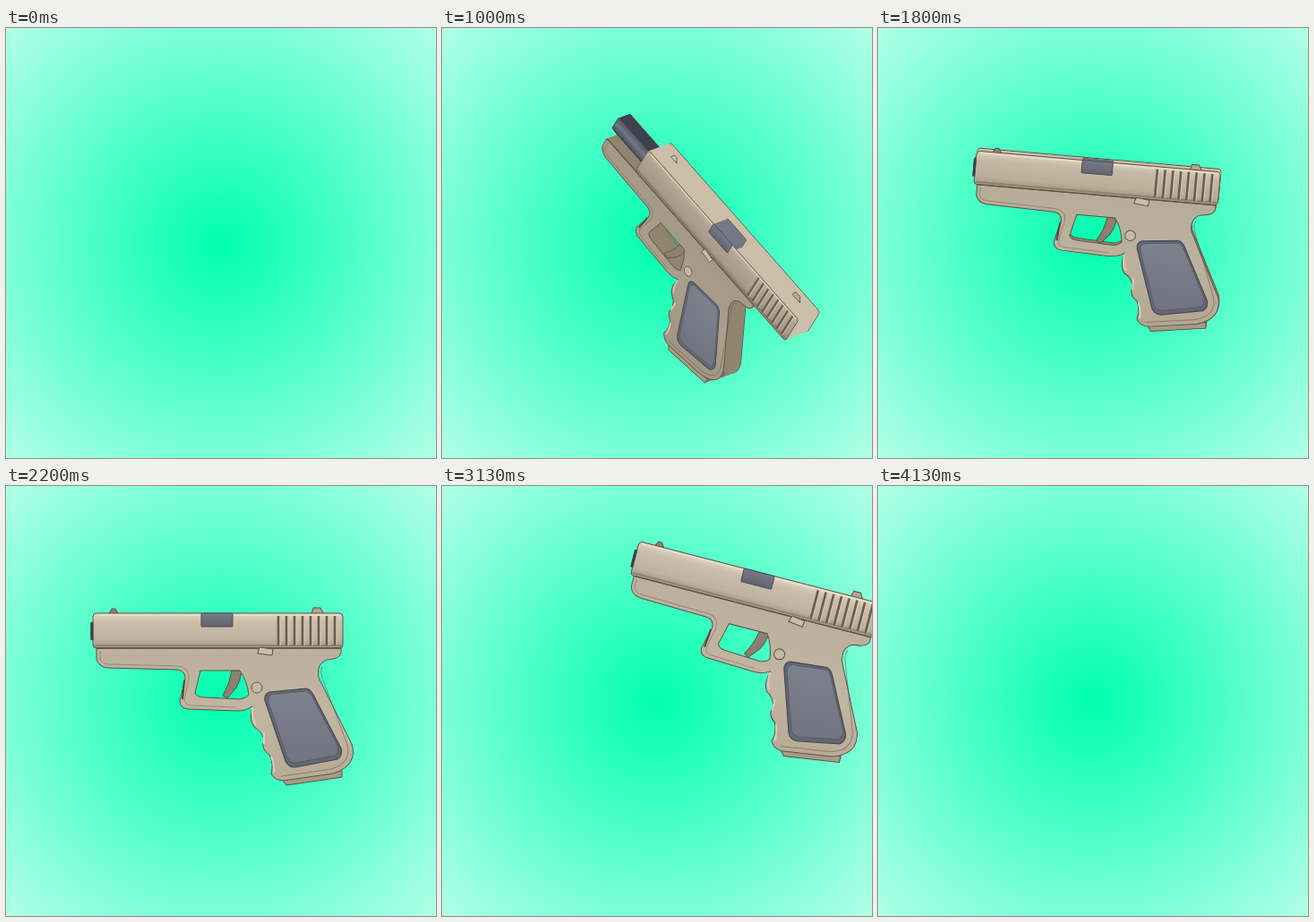
Animation of 480 by 480 pixels, one loop 4190 ms. Source, as an HTML page with a canvas:

```html
<!DOCTYPE html>
<html lang="en">
<head>
<meta charset="utf-8">
<title>Pistol</title>
<style>
html, body { margin: 0; width: 100%; height: 100%; overflow: hidden; }
canvas { display: block; width: 480px; height: 480px; }
</style>
</head>
<body>
<canvas id="stage" width="480" height="480"></canvas>
<script>
const ctx = document.getElementById('stage').getContext('2d');
const LOOP = 4190;
const PIVOT = [331, 181];
const LINE = '#5c5346';

// Rolling in: time, x axis, y axis, screen place of the pivot, depth vector
const ROLL = [
  [130, .2, .86, -.62, .25, 560, 560, 24, -3],
  [670, .43, .76, -.45, .45, 335, 298, 27, -5],
  [1000, .6, .68, -.38, .6, 322, 280, 24, -9],
  [1470, .877, .412, -.417, .771, 351, 246, 5, -15],
  [1730, .97, .103, -.104, .943, 336, 197, 1, -4],
  [2130, 1, 0, 0, 1, 331, 181, 0, 0]
];
// Flat side view: time, angle in degrees, offset from rest
const TURN = [
  [2670, 0, 0, 0],
  [2800, 15, 89, -51],
  [2930, 17, 124, -61],
  [3130, 14.5, 106, -23],
  [3330, 5, 39, -9],
  [3530, 0, 0, 0],
  [3670, 0, 0, 0],
  [3870, 9, 9, 44],
  [4000, 21, 29, 179],
  [4130, 30, 49, 459]
];
const RACK = [[670, 0], [800, 57], [1130, 57], [1200, 0], [2530, 0], [2600, 40], [2670, 57], [2730, 20], [2800, 0]];
const FLASH = [[2530, 0], [2600, .35], [2670, .35], [2800, 0]];
const PULL = [[2330, 0], [2530, 1], [2800, 1], [2930, 0]];
const SHELL = [[2600, 325, 118], [2670, 445, 13]];

function sample(keys, t) {
  const next = keys.findIndex(k => k[0] > t);
  if (next === 0) return keys[0].slice(1);
  if (next < 0) return keys[keys.length - 1].slice(1);
  const a = keys[next - 1], b = keys[next];
  const p = (t - a[0]) / (b[0] - a[0]);
  return a.slice(1).map((v, i) => v + (b[i + 1] - v) * p);
}

function poseAt(t) {
  if (t < 2130) return sample(ROLL, t);
  const [deg, x, y] = sample(TURN, t);
  const cos = Math.cos(deg * Math.PI / 180), sin = Math.sin(deg * Math.PI / 180);
  return [cos, sin, -sin, cos, PIVOT[0] + x, PIVOT[1] + y, 0, 0];
}

function fade(y0, y1, ...colors) {
  const g = ctx.createLinearGradient(0, y0, 0, y1);
  colors.forEach((c, i) => g.addColorStop(i / (colors.length - 1), c));
  return g;
}

function box(x, y, w, h, r) {
  const p = new Path2D();
  p.roundRect(x, y, w, h, r);
  return p;
}

const backdrop = ctx.createRadialGradient(240, 240, 0, 240, 240, 340);
backdrop.addColorStop(0, 'rgb(0,255,175)');
backdrop.addColorStop(1, 'rgb(178,255,230)');

const frame = new Path2D(
  'M101 180H374V186Q373 193 358 194Q346 198 349 214L386 288Q393 312 365 321' +
  'L309 329Q299 328 296 321Q299 310 294 300Q284 294 288 283Q285 273 277 269Q271 262 275 246' +
  'Q268 251 258 251L203 249Q194 248 194 240L200 215Q200 206 191 205L114 203Q103 202 101 193Z' +
  'M217 206L211 231Q213 236 222 236L261 238Q268 237 271 233Q269 217 261 206Z');
const foot = new Path2D('M308 327L313 334L375 325V318Z');
const panel = new Path2D(
  'M294 230L335 226Q340 227 343 233L374 293Q376 301 370 305L323 314Q315 314 312 307L289 239Q288 232 294 230Z');
const panelInset = new Path2D();
panelInset.addPath(panel, new DOMMatrix().translate(332, 269).scale(.91).translate(-332, -270));
const trigger = new Path2D('M252 206H263Q262 217 257 225L247 237L242 234Q250 221 252 206Z');
const slide = box(97, 142, 279, 39, 4);
const barrel = box(95, 152, 130, 20, 2);
const rail = box(97, 173, 130, 5, 1);
const port = box(218, 142, 35, 15, 1);
const frontSight = new Path2D('M115 143L118 137H122L126 143Z');
const rearSight = new Path2D('M341 143L343 136H351L355 143Z');
const latch = new Path2D('M283 180L298 182L297 189L281 187Z');
const pin = box(274, 219, 12, 12, 6);

const slideFill = fade(142, 181, '#e2d6c3', '#cabeaa', '#c5b8a4', '#bfb29e', '#a39682');
const frameFill = fade(181, 330, '#bcb09d', '#c2b6a3', '#b7aa95');
const barrelFill = fade(152, 172, '#555967', '#737785', '#494c58');
const portFill = fade(142, 157, '#787c8a', '#60636f');
const panelFill = fade(230, 310, '#7d818d', '#71747f');

function paint(path, fill, line = LINE, width = 1) {
  ctx.fillStyle = fill;
  ctx.fill(path, 'evenodd');
  if (!line) return;
  ctx.strokeStyle = line;
  ctx.lineWidth = width;
  ctx.stroke(path);
}

function strokes(d, color, width) {
  ctx.strokeStyle = color;
  ctx.lineWidth = width;
  ctx.stroke(new Path2D(d));
}

function drawGun(t) {
  const [a, b, c, d, x, y, dx, dy] = poseAt(t);
  const [rack] = sample(RACK, t);
  const [pull] = sample(PULL, t);
  const depth = Math.hypot(dx, dy);
  const shade = `rgba(70,60,45,${Math.min(1, depth / 20) * .2})`;

  function place(shift, back) {
    const px = PIVOT[0] - shift, py = PIVOT[1];
    ctx.setTransform(a, b, c, d, x - a * px - c * py + dx * back, y - b * px - d * py + dy * back);
  }
  // Stacks copies of a shape along the depth vector
  function extrude(path, fill, shift, far, near) {
    if (depth < .5) return;
    const n = Math.ceil(depth);
    for (let i = 0; i <= n; i++) {
      place(shift, far + (near - far) * i / n);
      paint(path, fill, i ? null : LINE);
    }
  }

  extrude(frame, '#91856f', 0, .8, 0);
  extrude(foot, '#857a67', 0, .8, 0);
  place(0, .4);
  paint(rail, '#363943', null);
  if (rack > 1) strokes('M98 175.5H157', '#7c8d8c', 1);
  extrude(barrel, '#3f424c', 0, .75, .25);
  place(0, .25);
  paint(barrel, barrelFill, '#3c3f49');

  place(0, 0);
  ctx.translate(pull * 6, 0);
  paint(trigger, '#8b8071');
  place(0, 0);
  paint(foot, '#a79a86');
  paint(frame, frameFill);
  paint(frame, shade, null);
  strokes('M105 184V193Q107 199 115 199L192 201Q205 202 204 215L199 239Q200 245 207 245L257 247', 'rgba(95,85,70,.45)', 1);
  strokes('M353 201Q350 207 353 214L381 289Q386 309 363 316L307 324', 'rgba(95,85,70,.55)', 1);
  strokes('M199 217L197 238', '#4d463c', 2);
  strokes('M275 247Q274 259 279 266M288 275V288M296 302Q300 312 299 320', '#d8cdba', 2);
  paint(panel, '#646874', '#454852', 1.2);
  paint(panelInset, panelFill, '#555965', .8);

  extrude(slide, '#cbbfaa', rack, 1, 0);
  extrude(port, '#757987', rack, .65, 0);
  place(rack, 0);
  if (depth < 10) {
    paint(frontSight, '#8e8274');
    paint(rearSight, '#b3a693');
  }
  paint(slide, slideFill);
  paint(slide, shade, null);
  strokes('M102 144H373', 'rgba(239,229,211,.75)', 1.5);
  strokes('M99 178H374', 'rgba(100,88,72,.4)', 2);
  for (let i = 0; i < 8; i++) {
    const sx = 304 + i * 9;
    strokes(`M${sx} 145V178`, '#675d50', 2.6);
    strokes(`M${sx + 2.2} 145V178`, '#d2c6b2', 1);
  }
  paint(port, portFill, '#4a4d57');
  if (depth >= 10) {
    place(rack, .6);
    paint(frontSight, '#cfc3af');
    paint(rearSight, '#b8ab97');
  }

  place(0, 0);
  if (rack < 1) strokes('M96 152V172', '#3f434e', 3);
  strokes('M101 181H374', LINE, 1.3);
  paint(latch, '#cbbea8');
  paint(pin, '#c6baa5');
  ctx.resetTransform();
}

function drawShell(t) {
  if (t < 2600 || t > 2670) return;
  const [x, y] = sample(SHELL, t);
  paint(box(x - 15, y - 7, 30, 14, 1), '#bd9e70', '#8a7657');
  paint(box(x - 15, y + 3, 30, 4, 1), '#776850', null);
}

function draw(t) {
  ctx.resetTransform();
  ctx.fillStyle = backdrop;
  ctx.fillRect(0, 0, 480, 480);
  const [flash] = sample(FLASH, t);
  ctx.fillStyle = `rgba(255,255,255,${flash})`;
  ctx.fillRect(0, 0, 480, 480);
  if (t < 200 || t >= 4130) return;
  drawGun(t);
  drawShell(t);
}

// Fifteen poses a second, each start rounded to 10 ms
const startOf = k => Math.round(k * 20 / 3) * 10;
function stepped(t) {
  let k = Math.floor(t / 66) + 1;
  while (startOf(k) > t) k--;
  return startOf(k);
}

const begin = performance.now();
function tick() {
  draw(stepped((performance.now() - begin) % LOOP));
  requestAnimationFrame(tick);
}
tick();
</script>
</body>
</html>
```
